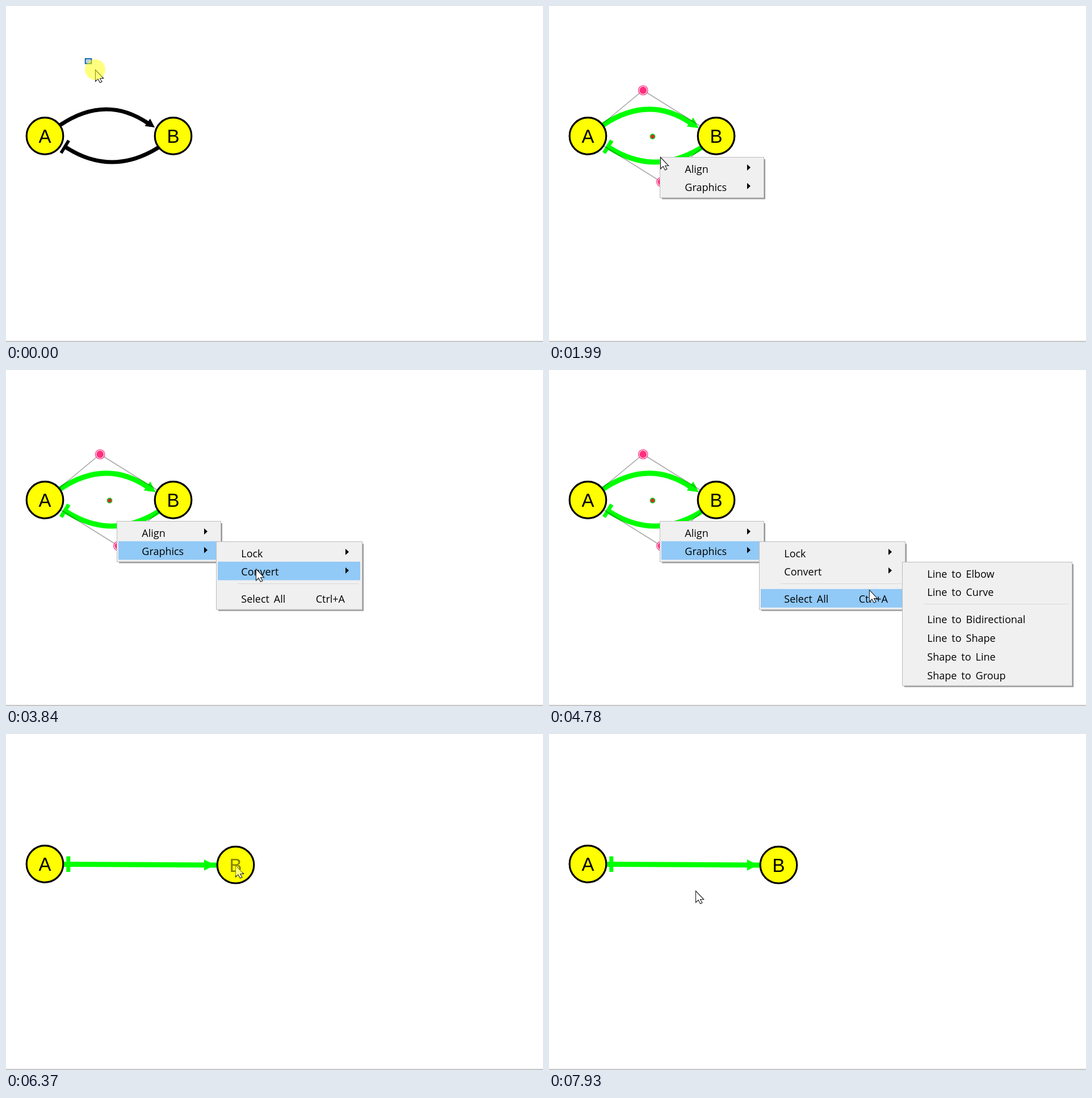
An HTML page that plays this animation: 946 by 592 pixels, repeating every 8 s.

```html
<!DOCTYPE html>
<html lang="en">
<head>
<meta charset="utf-8">
<title>Merging two edges</title>
<style>
  html, body { margin: 0; width: 100%; height: 100%; overflow: hidden; background: #fff; }
  svg { display: block; width: 946px; height: 592px; }
  .node circle { fill: #ff0; stroke: #000; stroke-width: 3.2; }
  .node text { font: 33px "Liberation Sans", Arial, sans-serif; text-anchor: middle; }
  .edge { color: #000; stroke-width: 7; }
  .edge path { fill: none; stroke: currentColor; }
  .edge polygon { fill: currentColor; }
  .edge .bar { stroke-width: 5.5; }
  .edge.on { color: #0f0; stroke-width: 9; }
  .edge.on .bar { stroke-width: 7; }
  .edge.on .tip { stroke: currentColor; stroke-width: 2; }
  .guide path { fill: none; stroke: #000; stroke-opacity: .35; stroke-width: 1.5; }
  .guide circle { fill: #ff2f7f; }
  .guide .ring { fill: #fff; stroke: #ff2f7f; stroke-width: 1.3; }
  .menu text { font: 18px "Open Sans", "Noto Sans", sans-serif; word-spacing: 3.3px; }
  #band { fill: #005aaa; fill-opacity: .28; stroke: #0058a8; stroke-width: 1.7; }
</style>
</head>
<body>
<svg viewBox="0 0 946 592">
  <rect y="590" width="946" height="2" fill="#c6c6c6"/>
  <g id="curves">
    <g class="edge" id="upper">
      <path d="M95 210Q175.500 155.700 250 206.500"/>
      <polygon class="tip" points="262,214 254,198.500 244.500,211.500"/>
    </g>
    <g class="edge" id="lower">
      <path d="M269 249Q185.500 301.500 104 248"/>
      <path class="bar" d="M110.500 237L97 259"/>
    </g>
    <g class="guide" id="upperGuide">
      <path d="M68.500 229L165.700 148.500L294.500 229"/>
      <circle class="ring" cx="165.700" cy="148.500" r="8.200"/>
      <circle cx="165.700" cy="148.500" r="6.400"/>
    </g>
    <g class="guide" id="lowerGuide">
      <path d="M68.500 229L198 310L294.500 229"/>
      <circle class="ring" cx="198" cy="310" r="8.200"/>
      <circle cx="198" cy="310" r="6.400"/>
    </g>
    <circle id="centre" cx="182.500" cy="230" r="4" fill="#e8202c" stroke="#0d2010" style="stroke:#1fc01f" stroke-width="1.800"/>
  </g>
  <g class="edge on" id="straight">
    <path id="line"/>
    <path class="bar" d="M109.800 215.500V243"/>
    <polygon id="head"/>
  </g>
  <g class="node"><circle cx="68.500" cy="229" r="32.300"/><text x="68.500" y="241">A</text></g>
  <g class="node" id="nodeB"><circle r="32.300"/><text y="12">B</text></g>
  <rect id="band"/>
  <g id="menus"></g>
  <g id="cursor">
    <path d="M.5 .5V21L5 16.500L8.500 23L12 21.500L8.500 15.500H14.700Z" fill="#fff" stroke="#222" stroke-width="1.100"/>
    <circle id="click" r="18" fill="#ff0" fill-opacity=".5"/>
  </g>
</svg>
<script>
const LOOP = 8000, ROW = 32.7, GAP = 15.5, PAD = 3;
const $ = id => document.getElementById(id);

function add(parent, tag, attrs, text) {
  const el = document.createElementNS('http://www.w3.org/2000/svg', tag);
  for (const key in attrs) el.setAttribute(key, attrs[key]);
  if (text) el.textContent = text;
  return parent.appendChild(el);
}
const set = (el, attrs) => { for (const key in attrs) el.setAttribute(key, attrs[key]); };
const show = (el, on) => { el.style.display = on ? '' : 'none'; };
const within = (t, ...spans) => spans.some(([from, to]) => t >= from && t < to);

// Items are labels; '-' is a separator, a trailing '>' marks a submenu, '|' precedes a shortcut.
function makeMenu(x, y, width, items) {
  const group = add($('menus'), 'g', { class: 'menu' });
  const rows = [], right = x + width;
  let next = y + PAD;
  const shadow = add(group, 'rect', { x: x + 4, y: y + 4, width: width - 1, fill: '#000', 'fill-opacity': .4 });
  const panel = add(group, 'rect', { x: x + .5, y: y + .5, width, fill: '#f0f0f0', stroke: '#bcbcbc' });
  const mark = add(group, 'rect', { x: x + PAD, width: width - 6, height: ROW, fill: '#91c9f7' });
  for (const item of items) {
    if (item === '-') {
      add(group, 'path', { d: `M${x + 38} ${Math.round(next + 6) + .5}H${right - 6}`, stroke: '#d7d7d7' });
      next += GAP;
      continue;
    }
    const [label, shortcut] = item.replace('>', '').split('|');
    const base = next + 24.5;
    add(group, 'text', { x: x + 44.3, y: base }, label);
    if (shortcut) add(group, 'text', { x: right - 30, y: base, 'text-anchor': 'end' }, shortcut);
    if (item.endsWith('>')) add(group, 'path', { d: `M${right - 29} ${next + 10}l6 5.5l-6 5.500z` });
    rows.push(next);
    next += ROW;
  }
  set(panel, { height: next + PAD - y });
  set(shadow, { height: next + PAD - y - 1 });
  return {
    rowAt: py => rows.findIndex(top => py >= top && py < top + ROW),
    update(open, row) {
      show(group, open);
      show(mark, row >= 0);
      if (row >= 0) set(mark, { y: rows[row] });
    }
  };
}

const mainMenu = makeMenu(195, 266, 183, ['Align>', 'Graphics>']);
const alignMenu = makeMenu(370, 269, 281, ['Align Left', 'Align Center', 'Align Right', '-',
  'Align Top', 'Align Middle', 'Align Bottom', '-', 'Distribute Horizontally', 'Distribute Vertically']);
const graphicsMenu = makeMenu(370, 302, 257, ['Lock>', 'Convert>', '-', 'Select All|Ctrl+A']);
const convertMenu = makeMenu(622, 338, 299, ['Line to Elbow', 'Line to Curve', '-',
  'Line to Bidirectional', 'Line to Shape', 'Shape to Line', 'Shape to Group']);

// Bursts of screen updates: start, end, number of steps.
const bursts = [[0, 0, 1], [70, 350, 5], [500, 990, 8], [1190, 1190, 1], [1520, 1730, 4], [1990, 2480, 8],
  [2690, 2830, 3], [3090, 3160, 2], [3430, 4170, 10], [4370, 4440, 2], [4640, 5140, 8],
  [5340, 6090, 11], [6160, 6940, 12], [7010, 7790, 12], [7860, 7930, 2]];

function snap(t) {
  const [start, end, steps] = bursts.filter(b => b[0] <= t).pop();
  const step = (end - start) / (steps - 1) || 1;
  return Math.min(end, start + Math.floor((t - start + 4) / step) * step);
}

const pointer = [[0, 157, 112], [280, 252, 375], [350, 244, 383], [500, 244, 383], [990, 200, 266],
  [1120, 200, 266], [1190, 196, 266], [1990, 196, 266], [2410, 244, 288], [2690, 244, 288],
  [2830, 250, 305], [3090, 250, 305], [3160, 268, 305], [3350, 268, 305], [3840, 440, 350],
  [4170, 441, 352], [4370, 441, 352], [4440, 462, 352], [4570, 462, 352], [5140, 735, 446],
  [5560, 735, 446], [6020, 294, 229], [6160, 294, 229], [6370, 404, 231], [6440, 404, 231],
  [6720, 254, 174], [6800, 255, 186], [6870, 265, 244], [6940, 266, 277], [7010, 266, 277],
  [7300, 258, 266], [7650, 258, 280], [7790, 264, 280], [7860, 264, 282], [7930, 258, 276]];
const bandEnd = [[0, 150.5, 101.5], [280, 246, 366], [350, 244, 383], [6790, 255.5, 182],
  [6870, 265.5, 228], [6940, 266, 270], [7010, 266, 276], [7300, 258, 266], [7650, 258, 280]];
const nodeTrack = [[6160, 294.5, 229], [6370, 404.5, 230.7]];

function at(track, t) {
  const i = track.findIndex(key => key[0] > t);
  if (i < 0) return track[track.length - 1].slice(1);
  if (i === 0) return track[0].slice(1);
  const [t0, x0, y0] = track[i - 1], [t1, x1, y1] = track[i];
  const k = (t - t0) / (t1 - t0);
  return [x0 + (x1 - x0) * k, y0 + (y1 - y0) * k];
}

function drawMenus(t, x, y) {
  const open = from => within(t, [from, 5400]);
  mainMenu.update(open(1580), t < 2050 ? -1 : t < 2800 ? 0 : 1);
  alignMenu.update(within(t, [2400, 3080]), -1);
  graphicsMenu.update(open(3150), x < 370 ? -1 : x < 622 ? graphicsMenu.rowAt(y) : 1);
  convertMenu.update(open(4080), x < 622 ? -1 : convertMenu.rowAt(y));
}

function draw(t) {
  const [x, y] = at(pointer, t), [bx, by] = at(nodeTrack, t), [ex, ey] = at(bandEnd, t);
  set($('cursor'), { transform: `translate(${x} ${y})` });
  show($('click'), within(t, [0, 340], [1515, 1720], [2685, 2755], [5335, 5400], [6080, 6430], [6780, 7920]));

  const [left, top] = t < 500 ? [139.7, 92.8] : [254.7, 175];
  show($('band'), within(t, [0, 490], [6780, 7700]));
  set($('band'), { x: left, y: top, width: Math.max(0, ex - left), height: Math.max(0, ey - top) });

  const upperOn = t >= 135, lowerOn = t >= 205, merged = t >= 5400;
  $('upper').classList.toggle('on', upperOn);
  $('lower').classList.toggle('on', lowerOn);
  show($('upperGuide'), upperOn);
  show($('lowerGuide'), lowerOn);
  show($('centre'), lowerOn);
  show($('curves'), !merged);
  show($('straight'), merged);

  set($('nodeB'), { transform: `translate(${bx} ${by})` });
  set($('line'), { d: `M102 229.400L${bx - 32} ${by + .3}` });
  set($('head'), { points: `${bx - 55.5},${by - 9.7} ${bx - 36.5},${by + .3} ${bx - 55.5},${by + 10}` });
  drawMenus(t, x, y);
}

const begin = performance.now();
function frame() {
  draw(snap((performance.now() - begin) % LOOP));
  requestAnimationFrame(frame);
}
frame();
</script>
</body>
</html>
```
